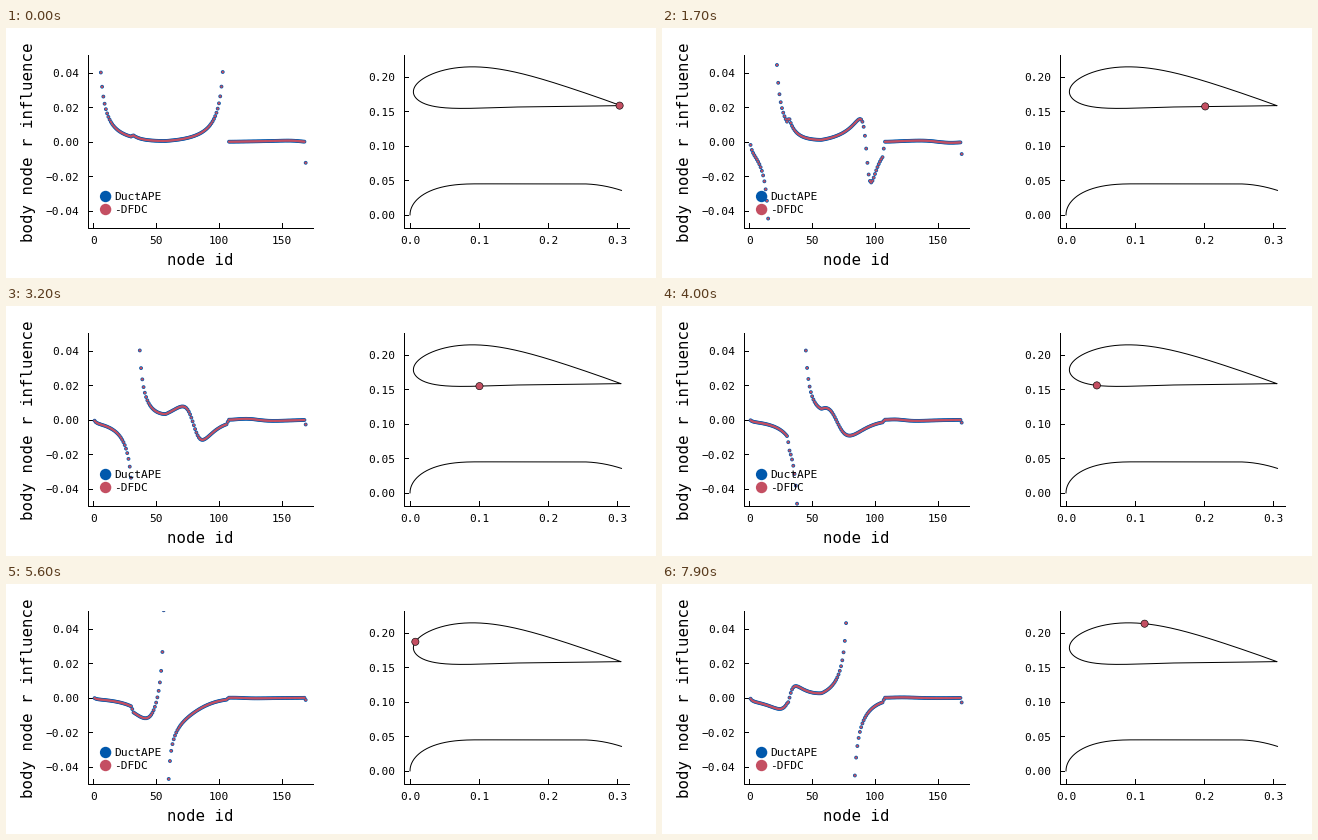
A matplotlib script that plays this animation: 650x250 px, repeating every 8 s.

```python
import numpy as np
import matplotlib.pyplot as plt
from matplotlib.animation import FuncAnimation
from matplotlib.patches import Circle, Rectangle

W, H, DPI = 650, 250, 100
PX = 72 / DPI                      # points per pixel
FRAMES, INTERVAL = 80, 100
BLUE, RED = "#0058ac", "#c44f62"
FONT = "DejaVu Sans Mono"

GX, GY, SCALE = 404.0, 186.9, 690  # geometry panel: origin, pixels per unit
IX, IY = 87.3, 113.7               # influence panel: origin
DX, DY = 1.2567, 1730              # pixels per node, per unit influence
TOP, BOTTOM = 27, 199.8


def duct_shape(n=1600):
    """Class-shape airfoil, from the trailing edge below the nose and back."""
    theta = np.linspace(0, 2 * np.pi, n)
    t = (1 + np.cos(theta)) / 2
    upper = 0.092 + 0.123 * t * (1 - t)**2
    lower = -0.026 - 0.055 * (1 - t)**2.8
    r = 0.1783 - 0.0199 * t + np.sqrt(t) * (1 - t) * np.where(theta < np.pi, lower, upper)
    return 0.0049 + 0.3005 * t, r


def hub_shape(n=800):
    """Rounded nose, straight body and a parabolic tail."""
    x = 0.3065 * np.linspace(0, 1, n)**2
    nose = np.sqrt(1 - np.clip(1 - x / 0.1, 0, 1)**2.6)
    tail = (np.maximum(x - 0.248, 0) / 0.0585)**2
    return x, 0.045 * nose - 0.0095 * tail


def duct_panels():
    """Relative sizes: even aft part, then clustering at the nose."""
    p = np.arange(1, 107)
    aft = 4.38 * (1 - 0.48 * np.exp(-(p - 1) / 1.6))
    fore = 1.7 + 4.8 * (np.maximum(57 - p, 0) / 26)**1.6
    top = 1.7 + 3.75 * np.sin(np.pi * (p - 57) / 72)
    return np.select([p < 31, p < 57], [aft, fore], top)


def split(curve, size):
    """Nodes, panel midpoints and node weights for given panel sizes."""
    x, r = curve
    arc = np.r_[0, np.cumsum(np.hypot(np.diff(x), np.diff(r)))]
    size = size * arc[-1] / size.sum()
    s = np.r_[0, np.cumsum(size)]

    def at(q):
        return np.array([np.interp(q, arc, x), np.interp(q, arc, r)])

    return at(s), at((s[1:] + s[:-1]) / 2), (np.r_[size, 0] + np.r_[0, size]) / 2


def elliptic(m):
    """Complete elliptic integrals K and E by the AGM."""
    a, b, s = np.ones_like(m), np.sqrt(1 - m), m / 2
    for n in range(8):
        c = (a - b) / 2
        a, b = (a + b) / 2, np.sqrt(a * b)
        s = s + 2.0**n * c**2
    k = np.pi / (2 * a)
    return k, k * (1 - s)


def ring_vr(x, r, xs, rs):
    """Radial velocity at (x, r) from unit vortex rings at (xs, rs)."""
    dx = x - xs
    far = dx**2 + (r + rs)**2
    near = dx**2 + (r - rs)**2
    k, e = elliptic(4 * r * rs / far)
    return dx / (2 * np.pi * r * np.sqrt(far)) * (e * (r**2 + rs**2 + dx**2) / near - k)


duct, hub = duct_shape(), hub_shape()
duct_nodes, centers, duct_w = split(duct, duct_panels())
hub_nodes, _, hub_w = split(hub, np.ones(61))
node_x, node_r = np.hstack([duct_nodes, hub_nodes])
weight = np.r_[duct_w, hub_w]
node_px = IX + DX * np.arange(1, len(node_x) + 1)


def influence(x, r):
    v = weight * ring_vr(x, r, node_x, node_r)
    # trailing edge gap of the hub acts as a sink
    v[-1] = -3.06e-4 * r / ((x - node_x[-1])**2 + r**2)**1.5
    return v


def to_px(x, r):
    return GX + SCALE * x, GY - SCALE * r


fig = plt.figure(figsize=(W / DPI, H / DPI), dpi=DPI, facecolor="white")
ax = fig.add_axes([0, 0, 1, 1])
ax.set(xlim=(0, W), ylim=(H, 0))
ax.axis("off")


def line(x, y):
    ax.plot(x, y, color="black", lw=PX)


def text(x, y, s, size, ha="center", va="baseline", **kw):
    ax.text(x, y, s, fontsize=size * PX, family=FONT, ha=ha, va=va, **kw)


def disc(x, y, radius, color, edge=0):
    return ax.add_patch(Circle((x, y), radius, fc=color, lw=edge * PX, zorder=6,
                               ec="black" if edge else "none"))


def cloud(size, color, z):
    n = len(node_px)
    dots = ax.scatter(node_px, np.zeros(n), s=np.full(n, (size * PX)**2),
                      color=color, linewidths=0, zorder=z)
    dots.set_clip_path(Rectangle((82, TOP), 225, BOTTOM - TOP, transform=ax.transData))
    return dots


def frame(left, right, xticks, yticks):
    line([left, left, right], [TOP, BOTTOM, BOTTOM])
    for x, label in xticks:
        line([x, x], [BOTTOM, BOTTOM - 4.5])
        text(x, 216, label, 11.1)
    for y, label in yticks:
        line([left, left + 4.5], [y, y])
        text(left - 9, y + 4.4, label.replace("-", "\u2212"), 11.1, ha="right")


frame(81.8, 306.5,
      [(IX + DX * n, str(n)) for n in range(0, 151, 50)],
      [(IY - DY * k / 50, f"{k / 50:.2f}") for k in range(-2, 3)])
frame(397.8, 622.5,
      [(GX + SCALE * k / 10, f"{k / 10:.1f}") for k in range(4)],
      [(GY - SCALE * k / 20, f"{k / 20:.2f}") for k in range(5)])
text(194.7, 237, "node id", 15.7)
text(30, 114, "body node r influence", 15.7, ha="right", va="center", rotation=90)

line(*to_px(*duct))
line(*to_px(*hub))

clouds = cloud(3.8, BLUE, 3), cloud(2.4, RED, 4)
marker = disc(0, 0, 3.6, RED, edge=0.6)

for y, color, label in ((168.5, BLUE, "DuctAPE"), (181.5, RED, "-DFDC")):
    disc(99.6, y, 5.7, color)
    text(108.4, y + 3.7, label, 11.2, ha="left", zorder=6)


def update(i):
    x, r = centers[:, i]
    points = np.column_stack([node_px, IY - DY * influence(x, r)])
    for dots in clouds:
        dots.set_offsets(points)
    marker.center = to_px(x, r)
    return *clouds, marker


anim = FuncAnimation(fig, update, frames=FRAMES, interval=INTERVAL,
                     repeat=True, repeat_delay=0, blit=False)
plt.show()
```
